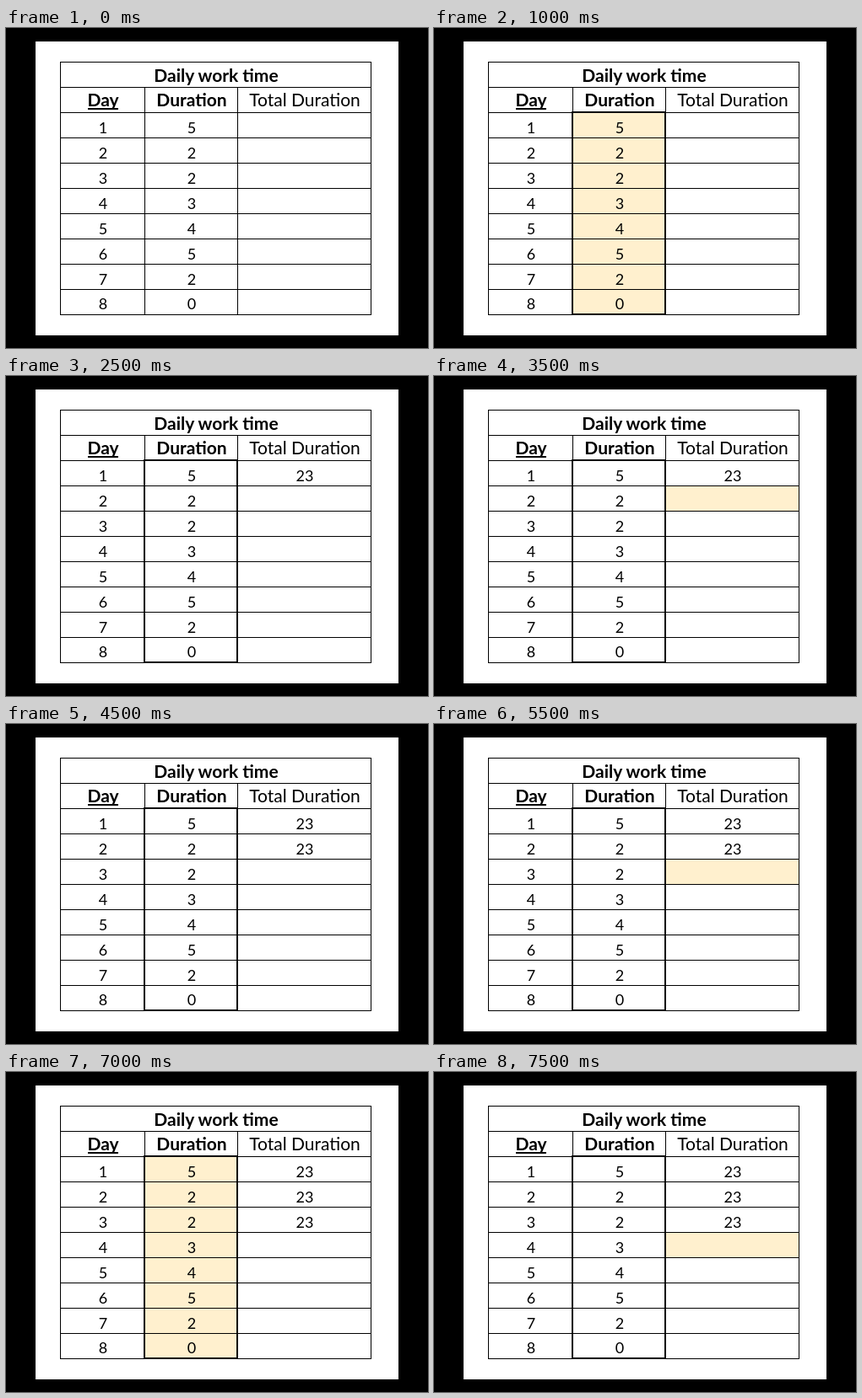
These frames come from a looping animation (500x380 px, 8 s). An HTML page:

```html
<!DOCTYPE html>
<html lang="en">
<head>
<meta charset="utf-8">
<title>Daily work time</title>
<style>
  html, body { margin: 0; width: 100%; height: 100%; overflow: hidden; background: #000; }
  svg { display: block; }
  text { font: 18px Lato, Carlito, sans-serif; text-anchor: middle; }
  .head { font-size: 21px; }
  .bold { font-weight: 700; }
</style>
</head>
<body>
<svg id="stage" width="500" height="380" viewBox="0 0 500 380"></svg>
<script>
const STEP = 500, LOOP = 8000;
const CREAM = '#fff0ce', GREEN = '#e2f0d9';
const durations = [5, 2, 2, 3, 4, 5, 2, 0];
const total = durations.reduce((a, b) => a + b);
const stage = document.getElementById('stage');

function add(tag, attrs, content = '') {
  const el = document.createElementNS('http://www.w3.org/2000/svg', tag);
  for (const name in attrs) el.setAttribute(name, attrs[name]);
  el.textContent = content;
  return stage.appendChild(el);
}
const rect = (x, y, width, height, fill) => add('rect', { x, y, width, height, fill });
const label = (x, y, content, cls = '') => add('text', { x, y, class: cls }, content);
const show = (el, on) => el.setAttribute('visibility', on ? 'visible' : 'hidden');
const rowTop = i => 100 + 30 * i;
const baseline = i => rowTop(i) + (i === 7 ? 24 : 25);

rect(35, 16, 430, 349, '#fff');
const column = rect(164, 100, 110, 240, CREAM);
const cell = rect(275, 101, 157, 29, CREAM);

// Grid
for (let y = 40; y <= 340; y += 30) rect(64, y, 369, 1, '#000');
for (const x of [64, 432]) rect(x, 40, 1, 301, '#000');
for (const x of [164, 274]) rect(x, 70, 1, 271, '#000');
const frame = add('rect', {
  x: 164, y: 100, width: 110, height: 240, fill: 'none', stroke: '#000', 'stroke-width': 2
});

label(249, 64, 'Daily work time', 'head bold');
label(115, 93, 'Day', 'head bold');
rect(97, 95, 36, 2, '#000');
label(220, 93, 'Duration', 'head bold');
label(354, 93, 'Total Duration', 'head');

const totals = durations.map((hours, i) => {
  label(115, baseline(i), i + 1);
  label(220, baseline(i), hours);
  return label(354, baseline(i), total);
});

// Each row takes four steps: rest, column lit, cell lit, total shown in the lit cell
function draw(time) {
  const step = Math.floor((time % LOOP) / STEP) - 1;
  const row = Math.max(0, Math.floor(step / 4));
  const phase = step < 0 ? 0 : step % 4;
  show(frame, step >= 0);
  show(column, phase === 1);
  show(cell, phase >= 2);
  cell.setAttribute('y', rowTop(row) + 1);
  cell.setAttribute('fill', phase === 3 ? GREEN : CREAM);
  totals.forEach((el, i) => show(el, i < row || (i === row && phase === 3)));
}

const start = performance.now();
function tick() {
  draw(performance.now() - start);
  requestAnimationFrame(tick);
}
tick();
</script>
</body>
</html>
```
